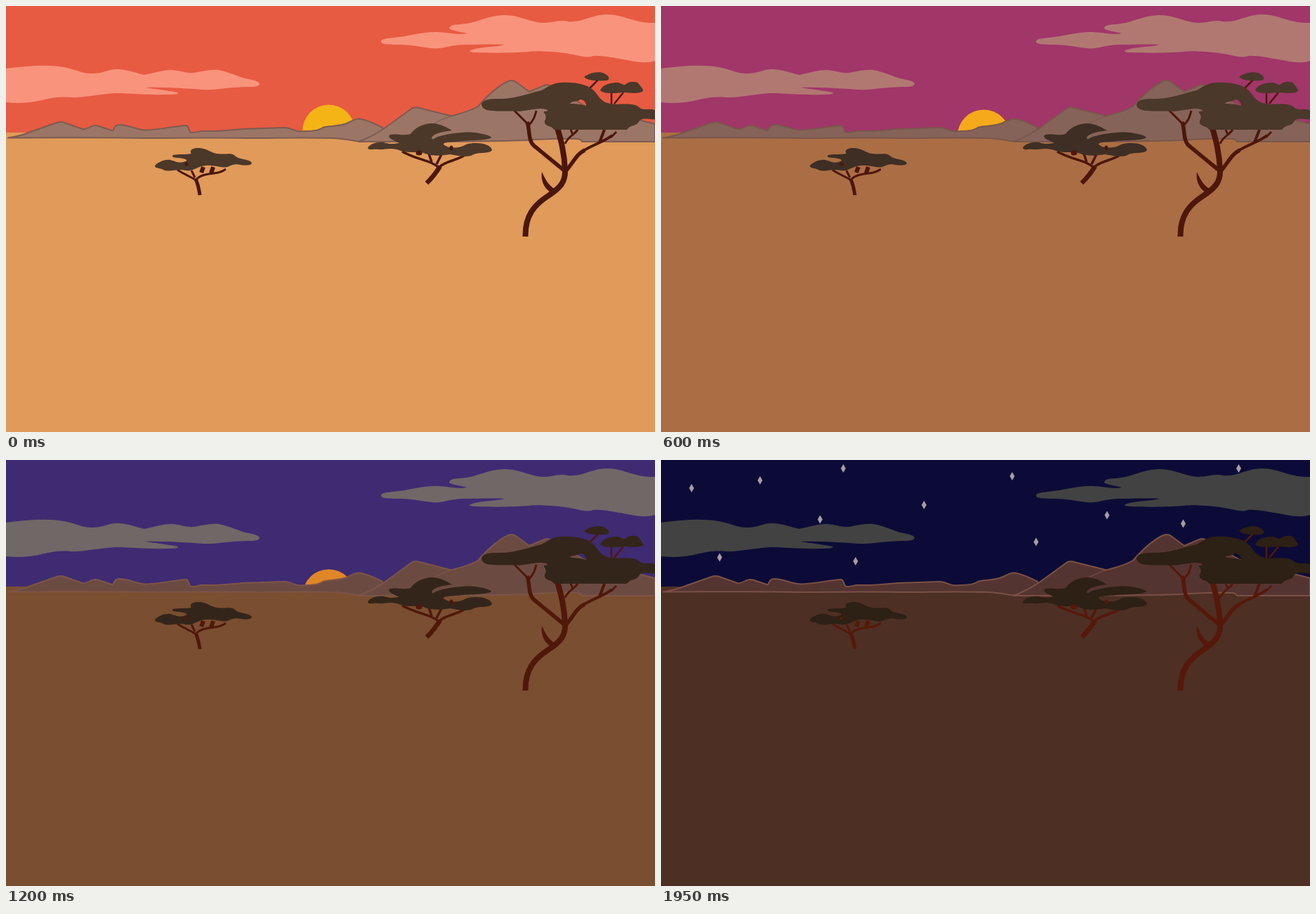
These frames come from a looping animation (924 px wide and 606 px high, 2100 ms). An HTML page without scripts:

```html
<!DOCTYPE html>
<html lang="en">
<head>
<meta charset="utf-8">
<title>Savanna sunset</title>
<style>
@property --sky { syntax: "<color>"; inherits: true; initial-value: #e75b42; }
@property --cloud { syntax: "<color>"; inherits: true; initial-value: #f9937c; }
@property --ground { syntax: "<color>"; inherits: true; initial-value: #e09a5a; }
@property --rock { syntax: "<color>"; inherits: true; initial-value: #9b7666; }
@property --ridge { syntax: "<color>"; inherits: true; initial-value: #7c5b52; }
@property --sun { syntax: "<color>"; inherits: true; initial-value: #f4b416; }
@property --leaf { syntax: "<color>"; inherits: true; initial-value: #4b3829; }
@property --far-leaf { syntax: "<color>"; inherits: true; initial-value: #4b3829; }
@property --bark { syntax: "<color>"; inherits: true; initial-value: #4b170a; }
@property --stars { syntax: "<number>"; inherits: true; initial-value: 0; }
@property --drop { syntax: "<length>"; inherits: true; initial-value: 0px; }

html, body { margin: 0; width: 100%; height: 100%; overflow: hidden; }
svg { display: block; width: 924px; height: 606px; animation: dusk 2100ms steps(2) infinite; }

@keyframes dusk {
  0% {
    --sky: #e75b42; --cloud: #f9937c; --ground: #e09a5a; --rock: #9b7666; --ridge: #7c5b52;
    --sun: #f4b416; --leaf: #4b3829; --far-leaf: #4b3829; --bark: #4b170a; --stars: 0; --drop: 0px;
    animation-timing-function: steps(3);
  }
  21.428% {
    --sky: #be3961; --cloud: #c67469; --ground: #ba774a; --rock: #8e6a5c; --ridge: #775550;
    --sun: #fab418; --leaf: #49372a; --far-leaf: #423228; --bark: #4c170a; --stars: 0; --drop: 5px;
  }
  35.714% {
    --sky: #843370; --cloud: #9b7c7a; --ground: #9c643e; --rock: #7d5b54; --ridge: #7c5748;
    --sun: #f09f20; --leaf: #4b3829; --far-leaf: #3a2a20; --bark: #4e170a; --stars: 0; --drop: 9px;
  }
  50% {
    --sky: #542f7a; --cloud: #7c7272; --ground: #855433; --rock: #745347; --ridge: #7f5748;
    --sun: #df8626; --leaf: #3a2a20; --far-leaf: #3a2a20; --bark: #4f180a; --stars: 0; --drop: 12px;
  }
  64.285% {
    --sky: #2a276a; --cloud: #645c5c; --ground: #6f472d; --rock: #61433a; --ridge: #7a5348;
    --sun: #e0862a; --leaf: #2d2014; --far-leaf: #2d2014; --bark: #50180a; --stars: 0; --drop: 18px;
  }
  78.571% {
    --sky: #1d1c50; --cloud: #525252; --ground: #603d2b; --rock: #61433b; --ridge: #7a5348;
    --sun: #e88a20; --leaf: #2d2014; --far-leaf: #2d2014; --bark: #52180a; --stars: .5; --drop: 26px;
  }
  92.857%, 100% {
    --sky: #0c0b37; --cloud: #424242; --ground: #4d2f24; --rock: #543431; --ridge: #7a5045;
    --sun: #e88a20; --leaf: #2d2014; --far-leaf: #2d2014; --bark: #56180a; --stars: 1; --drop: 33px;
  }
}

.sky { fill: var(--sky); }
.stars { fill: #a89ca5; opacity: var(--stars); }
.sun { fill: var(--sun); transform: translateY(var(--drop)); }
.cloud { fill: var(--cloud); }
.ground { fill: var(--ground); }
.rock { fill: var(--rock); stroke: var(--ridge); stroke-width: 2; stroke-linejoin: round; }
.line { fill: none; }
.leaf { fill: var(--leaf); fill-rule: evenodd; }
.far { fill: var(--far-leaf); fill-rule: evenodd; }
.bark { fill: none; stroke: var(--bark); }
.knot { fill: var(--bark); }
</style>
</head>
<body>
<svg viewBox="0 0 924 606">
  <defs>
    <path id="star" d="M0-6 3.5 0 0 6-3.5 0Z"/>
  </defs>
  <rect class="sky" width="924" height="606"/>

  <g class="stars">
    <use href="#star" x="43.500" y="40"/>
    <use href="#star" x="141" y="29"/>
    <use href="#star" x="259.500" y="12"/>
    <use href="#star" x="374.500" y="64"/>
    <use href="#star" x="226.500" y="84.500"/>
    <use href="#star" x="83.500" y="138.500"/>
    <use href="#star" x="277" y="144"/>
    <use href="#star" x="500" y="23"/>
    <use href="#star" x="534" y="116.500"/>
    <use href="#star" x="635" y="78.500"/>
    <use href="#star" x="743.500" y="90.500"/>
    <use href="#star" x="822.500" y="12"/>
  </g>

  <g class="cloud">
    <path d="M0 89C30 85 60 83 82 87C100 90 108 97 125 96C142 95 146 89 160 90C178 91 185 96 197 98C212 95 222 91 236 91C250 92 256 96 268 95C280 93 290 90 302 91C320 94 330 101 345 104C356 106 361 108 361 111C360 115 352 115 345 115C320 115 300 120 280 119C250 117 225 115 198 116C212 118 235 121 244 123C248 126 236 126 228 126C200 127 175 124 155 124C130 126 105 131 92 130C84 129 70 129 55 133C35 138 18 139 0 137Z"/>
    <path d="M534 50C535 46 545 46 552 45C575 43 590 37 612 37C630 37 642 42 656 39C650 37 630 35 631 31C634 25 645 27 655 25C672 23 685 14 708 13C730 12 745 23 765 24C780 24 785 19 800 22C820 24 835 12 855 12C880 12 895 25 924 24V78C915 81 905 81 890 78C870 75 850 70 836 71C828 74 822 72 812 70C795 66 765 63 745 65C720 67 690 67 668 66C655 65 660 63 668 61C680 58 700 58 710 55C695 54 670 55 650 55C630 56 620 62 605 60C590 58 575 55 560 55C545 55 533 55 534 50Z"/>
  </g>

  <circle class="sun" cx="459.500" cy="178" r="37.500"/>
  <rect class="ground" y="180" width="924" height="426"/>

  <g class="rock">
    <path d="M3 187.500C20 185 28 182 35 179L72 166Q79 163.500 86 167L110 175.500Q118 173.500 121 171.500Q127 168.500 134 171.500L152 177.500C155 172 155 169 162 169C175 169 185 176.500 200 176.500C220 175.500 240 171 256 170C261 170 259 177 263 180C270 181 275 177 285 178C305 179 325 175 350 174.500C370 174 385 173 398 173C408 174 410 178.500 420 178.500C440 177.500 445 177.500 452 172.500C460 170 475 172 487 166Q497 160.500 503 160.500C515 162 525 167 536 173L540 193H505C490 191 480 188.500 465 188C420 186.500 385 188 340 188C280 187 250 188 200 188C130 186.500 80 187.500 3 187.500Z"/>
    <path d="M502 193C520 186 530 180 540 173L578 145.500Q583 143 590 145.500L634 156.500C650 152 660 150 672 143C685 128 700 114 715 107Q721 104.500 726 108L745 122 765 113.500Q770 110.500 776 114L824 142 924 168V193H820C819 190 817 189 812 189C790 188 770 189 740 191C650 194 570 193 502 193Z"/>
    <path class="line" stroke-width="1.200" d="M634 156.500Q622 160 604 170"/>
  </g>

  <!-- left tree -->
  <g class="bark" stroke-width="3">
    <path stroke-width="5" d="M276 269C275 262 274 255 270 246"/>
    <path d="M271 248C262 242 254 240 244 233M271 247C276 240 288 239 296 238Q306 237 313 232M269 244 264 234"/>
    <path stroke-width="6" d="M278 237 281 229M292 238 295 229"/>
  </g>
  <path class="far" d="M212 227C216 223 224 218 234 219C240 220 244 224 252 222C262 220 256 217 246 216C238 216 235 214 238 212C246 210 255 212 264 210C260 206 266 202 272 202C284 201 290 208 300 210C312 212 320 208 326 213C332 219 345 217 350 223C350 227 342 227 334 226C326 224 322 226 315 229C308 231 296 226 284 227C272 228 266 236 256 234C244 231 236 236 226 234C218 229 212 232 212 227Z"/>
  <circle class="knot" cx="257" cy="225" r="2.500"/>

  <!-- middle tree -->
  <g class="bark" stroke-width="3.500">
    <path stroke-width="6.500" d="M599 252C606 245 612 238 618 228"/>
    <path d="M616 230C605 219 585 219 564 207M617 229C625 221 640 220 652 213M606 222 602 210M613 225 620 211"/>
  </g>
  <path class="far" d="M515 202C518 196 528 193 538 194C546 197 552 196 560 195C552 191 541 187 547 183C556 181 568 185 576 182C582 174 592 167 608 167C620 168 628 173 635 177C622 179 608 181 606 188Q607 190 609 189C614 185 632 181 650 180C668 178 690 184 691 187C688 191 665 191 650 192C636 194 622 193 623 197C630 203 645 203 655 197C668 193 690 195 692 205C688 211 672 207 664 212C656 216 644 213 632 211C615 214 605 213 597 210C588 206 575 210 562 206C548 200 540 205 530 204C522 203 517 206 515 202Z"/>
  <g class="knot">
    <ellipse cx="588" cy="209" rx="4.500" ry="3.500"/>
    <ellipse cx="634" cy="202" rx="2.500" ry="3.500"/>
  </g>

  <!-- right tree -->
  <g class="bark" stroke-width="3">
    <path stroke-width="8" d="M739.500 328C739 298 752 283 772 270C790 258 796 250 796 235C795 208 790 190 784 170"/>
    <path stroke-width="5.500" d="M796 235 752 199C743 192 746 175 742 165M797 235C808 222 812 211 824 205"/>
    <path stroke-width="4" d="M822 206C836 197 852 193 863 184M845 194 852 176"/>
    <path d="M743 168 722 147M744 170C752 162 753 156 755 149M861 187 869 179M796 196C800 186 808 184 814 176M804 176 807 183"/>
    <path stroke-width="2.500" d="M830 118 843 105M862 139V123M866 139 879 123"/>
  </g>
  <path class="knot" d="M777 266C766 260 761 248 763 236C768 246 771 254 782 261Z"/>
  <g class="leaf">
    <path d="M677 140C678 133 688 132 700 132C720 133 740 126 758 121C768 120 773 110 790 109C812 108 832 112 840 124C846 132 850 137 860 139C870 141 885 138 896 141C902 143 902 147 910 147Q918 146 924 148V161C918 162 908 158 902 163C898 172 890 168 884 176L780 176C778 170 765 172 767 163C772 155 764 152 766 150C776 150 770 146 760 146C745 147 735 151 722 149.500C700 149 678 152 677 140ZM803 139C806 134 815 137 817 133C823 133 826 138 826 142C816 139 808 139 803 139Z"/>
    <path d="M823 101C830 95 845 92 852 96C860 100 860 105 855 106C842 107 828 106 823 101Z"/>
    <path d="M846 120C850 110 865 109 872 109C880 112 880 114 884 110C890 107 899 107 901 111C904 115 908 119 907 121C902 125 892 124 880 123C868 124 852 126 846 120Z"/>
  </g>
</svg>
</body>
</html>
```
